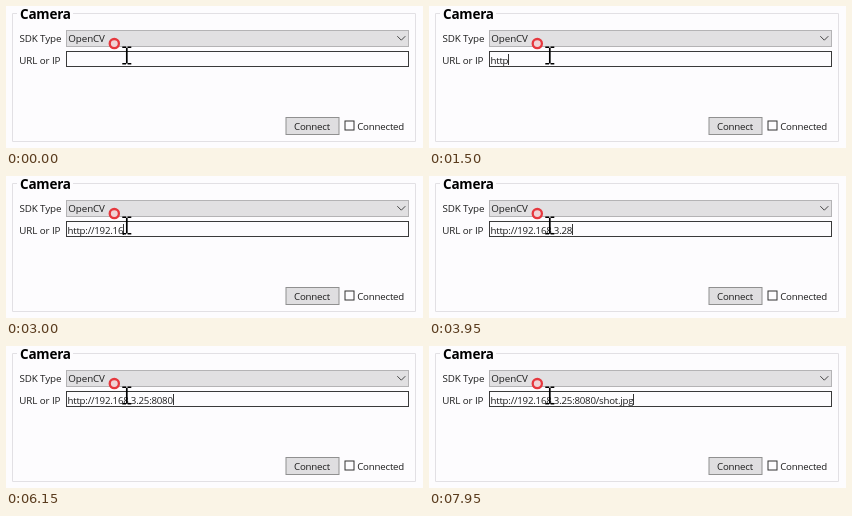
An HTML page that plays this animation: 417 by 142 pixels, repeating every 8 s.

```html
<!DOCTYPE html>
<html lang="en">
<head>
<meta charset="utf-8">
<title>Camera settings</title>
<style>
  html, body { margin: 0; width: 100%; height: 100%; overflow: hidden; background: #fdfcfe; }
  svg { display: block; width: 417px; height: 142px; }
  text { font-family: "Open Sans", "Noto Sans", sans-serif; font-size: 9.8px; letter-spacing: -.1px; fill: #1c1c1c; white-space: pre; }
  .title { font-size: 13.5px; font-weight: 700; letter-spacing: -.2px; fill: #000; }
  .tight { font-size: 9.7px; letter-spacing: -.2px; }
  .url { font-size: 9.7px; letter-spacing: -.23px; }
</style>
</head>
<body>
<svg viewBox="0 0 417 142">
  <rect width="417" height="142" fill="#fdfcfe"/>
  <path d="M11 7.5H6.5V135.5H409.5V7.5H67" fill="none" stroke="#e2e0e4"/>
  <text class="title" x="14" y="12.6">Camera</text>

  <text x="13.4" y="36.3">SDK Type</text>
  <rect x="60.5" y="24.5" width="342" height="16" fill="#e1e0e2" stroke="#b4b3b5"/>
  <text x="62.3" y="36.3">OpenCV</text>
  <path d="M391.3 30.2L395.3 34.2L399.3 30.2" fill="none" stroke="#444"/>

  <text x="13.3" y="57.6">URL or IP</text>
  <rect x="60.5" y="45.5" width="342" height="15" fill="#fdfcfe" stroke="#3a3a3a"/>
  <text id="url" class="url" x="61.5" y="57.5"></text>
  <rect id="caret" y="48" width="1" height="11" fill="#333"/>

  <rect x="280" y="111.5" width="53" height="17" fill="#dfdee0" stroke="#909090"/>
  <text class="tight" x="288" y="124.2">Connect</text>
  <rect x="339" y="115" width="9" height="9" fill="#fdfcfe" stroke="#333"/>
  <text class="tight" x="351.2" y="124.2">Connected</text>

  <circle cx="108.3" cy="37.6" r="4.6" fill="#f0d4d6" stroke="#e6383e" stroke-width="2.3"/>
  <path d="M116.3 41.3H120M121.6 41.3H125.3M116.3 57.8H120M121.6 57.8H125.3" stroke="#000" stroke-width="1.4"/>
  <path d="M120.8 41.6V57.5" stroke="#000" stroke-width="1.7"/>
</svg>
<script>
  const LOOP = 8000, BLINK = 530;
  const url = document.getElementById('url');
  const caret = document.getElementById('caret');

  // Each burst: keys typed, start time, gap between keys; "<" is backspace.
  const bursts = [
    ['http', 950, 150], [':', 1650, 0], ['//', 1850, 150], ['192', 2200, 170],
    ['.168', 2700, 130], ['.3', 3250, 150], ['.28', 3600, 150],
    ['<5', 4600, 150], [':', 5150, 0], ['8080', 5400, 165],
    ['/', 6300, 0], ['sho', 6550, 150], ['t.jpg', 7100, 160]
  ];
  const keys = bursts.flatMap(([chars, start, gap]) =>
    [...chars].map((char, i) => ({ char, at: start + i * gap })));

  function stateAt(t) {
    let text = '', last = 100 - 2 * BLINK;
    for (const { char, at } of keys) {
      if (at > t) break;
      text = char === '<' ? text.slice(0, -1) : text + char;
      last = at;
    }
    return { text, caretOn: (t - last) % (2 * BLINK) < BLINK };
  }

  function draw(t) {
    const { text, caretOn } = stateAt(t);
    if (url.textContent !== text) url.textContent = text;
    const width = text ? url.getComputedTextLength() : 0;
    caret.setAttribute('x', Math.floor(61.8 + width));
    caret.setAttribute('visibility', caretOn ? 'visible' : 'hidden');
  }

  let origin;
  function tick(now) {
    origin ??= now;
    draw((now - origin) % LOOP);
    requestAnimationFrame(tick);
  }
  draw(0);
  requestAnimationFrame(tick);
</script>
</body>
</html>
```
